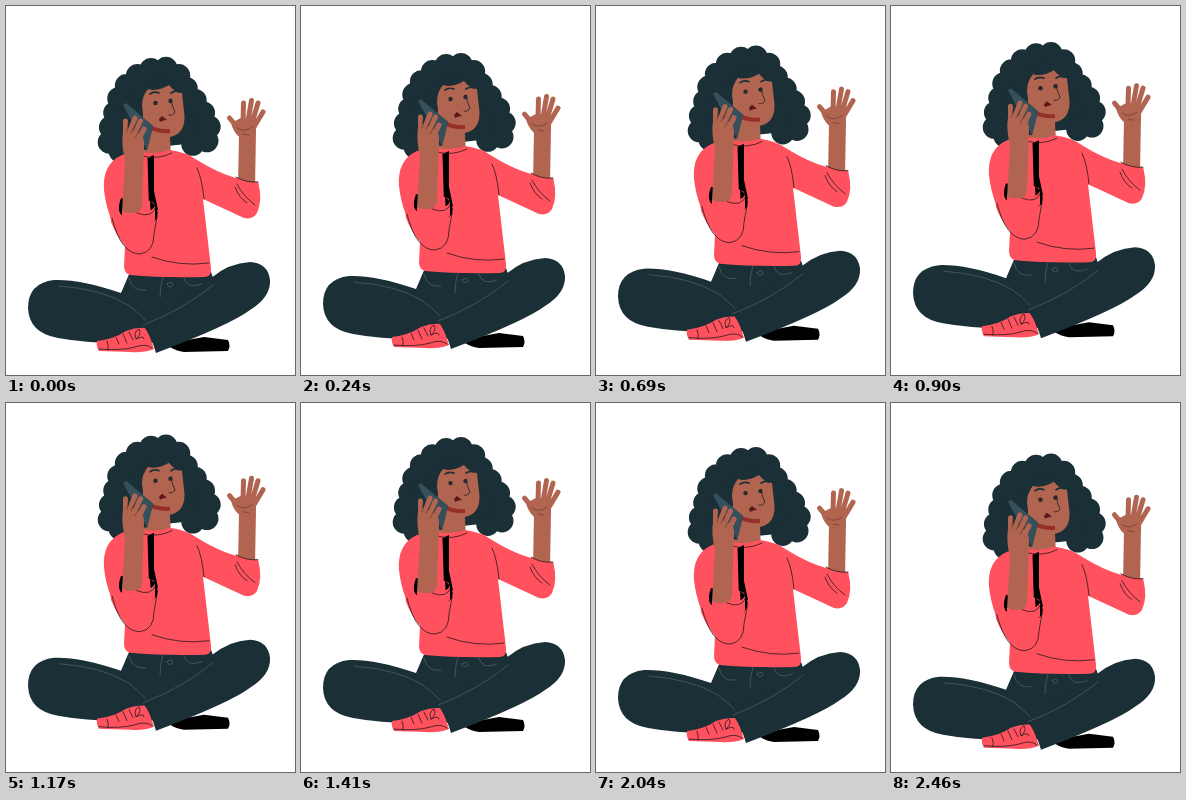
Animation of 289 by 369 pixels, one loop 2.52 s. Source, as an HTML page:

```html
<!DOCTYPE html>
<html lang="en">
<head>
<meta charset="utf-8">
<title>Phone call</title>
<style>
  html, body { margin: 0; width: 100%; height: 100%; overflow: hidden; background: #fff; }
  svg { display: block; width: 100%; height: 100%; }
  .dark { fill: #1b2f36; }
  .skin { fill: #b16551; }
  .red { fill: #ff525e; }
  .finger, .ink, .seam, .crease, .brow, .curls { fill: none; stroke-linecap: round; stroke-linejoin: round; }
  .finger { stroke: #b16551; stroke-width: 5; }
  .ink { stroke: #17181a; stroke-width: .75; }
  .seam { stroke: #5d6d73; stroke-width: .6; }
  .crease { stroke: #6f382d; stroke-width: .7; }
  .brow { stroke: #1b2f36; stroke-width: 1.7; }
  /* Round dots along the outline make the curls */
  .curls { fill: #1b2f36; stroke: #1b2f36; stroke-width: 23; stroke-dasharray: 0 15; }
</style>
</head>
<body>
<svg viewBox="0 0 289 369">
  <g id="figure">
    <g id="head">
      <path class="curls" d="M114 145 C96 143 104 122 109 106 C112 86 126 65 153 62 C172 61 176 74 182 86 C193 98 201 110 204 124 C206 138 194 139 180 138"/>
      <path class="skin" d="M137 108 L135 152 H165 L164 131 Q179 128 178.500 110 L176 87 Q168 86 163 79 Q151 86 142 83 Q136 90 136 100Z"/>
      <path d="M142 118 Q152 124 164 123 V127 Q150 128 141 122Z" fill="#962f28"/>
      <path class="brow" d="M144 88 Q148 85 153 87 M165 87 Q169 84 173 86"/>
      <path class="ink" d="M165 93 Q166 101 169 106 Q167 110 163 109"/>
      <g fill="#242b2e">
        <circle cx="149.500" cy="97" r="2.200"/>
        <circle cx="164.500" cy="95" r="2.200"/>
      </g>
      <path d="M153 113 L156 110 L161 114 Q157 114 154 116Z" fill="#5d1717"/>
    </g>

    <g id="legs">
      <path d="M165 337 L198 331 L222 334 Q225 340 222 345 L178 346 Q170 345 164 341Z"/>
      <path class="dark" d="M124 266 L115 287 Q74 273 48 274 Q22 277 22 302 Q23 327 52 332 Q85 338 122 337 L143 337 L180 332 L210 280 L205 266Z"/>
      <path class="red" d="M91 335 Q108 333 120 325 Q130 321 141 322 L148 343 Q138 347 124 346 L93 345 Q90 340 91 335Z"/>
      <path class="ink" d="M93 343 Q115 345 129 341 Q140 337 146 342 M101 335 Q103 340 102 344 M110 331 L113 338 M117 328 L121 337 M123 326 L127 334 M130 333 Q127 326 133 323 Q136 328 130 333 Q138 329 138 333"/>
      <path class="dark" d="M137 319 L205 272 Q223 257 244 256 Q262 257 264 274 Q265 291 244 304 Q224 319 150 347 Q146 332 137 319Z"/>
      <path class="seam" d="M53 280 Q96 283 122 299 Q132 306 139 314 M137 319 Q177 304 207 279 M123 272 Q126 286 140 284 M157 271 Q154 280 154 291 M178 272 Q181 284 196 278 M161 278 Q166 274 167 279 Q163 283 161 278"/>
    </g>

    <g id="shirt">
      <path class="red" d="M136 146 Q150 149 164 144 Q180 146 191 154 Q212 167 230 172 L252 176 Q257 194 251 207 Q247 214 238 212 L197 193 L205 262 Q206 271 198 271 Q157 272 124 269 Q118 267 118 260 L119 240 Q101 213 98 184 Q96 158 116 149 Q124 146 136 146Z"/>
      <path d="M141.500 152 L148 149 L148 185 L152 204 L143 204Z"/>
      <path class="ink" d="M136 150 Q152 154 166 147 M198 193 Q196 172 191 162 M146 251 Q174 261 203 257"/>
    </g>

    <g id="wave">
      <path class="skin" d="M233 128 L250 125 L249 182 H232Z"/>
      <path class="skin" d="M231 114 Q238 109 249 115 Q251 124 249 131 Q240 135 232 130 Q227 125 225 117Z"/>
      <path class="finger" d="M223.500 112 L232 122 M237.500 97 L237 116 M245.500 94.500 L242 115 M252 97 L246 117 M257 106 L248 121"/>
      <path class="crease" d="M231 122 Q238 127 246 121 M237 128 L243 129"/>
      <path class="red" d="M230 171 Q240 177 252 176 L254 192 L232 189Z"/>
      <path class="ink" d="M230 171 Q240 177 252 176 M231 178 Q237 190 249 199 M229 181 Q233 192 241 197"/>
    </g>

    <g id="call">
      <path class="red" d="M101 176 L148 197 Q152 210 149 222 Q150 248 134 248 Q116 244 105 216Z"/>
      <path class="ink" d="M106 212 Q115 248 134 248 Q148 246 148 228 L151 211"/>
      <path d="M115 192 Q110 206 117 210 L122 208 V194Z"/>
      <path d="M144 195 Q154 201 151 212 Q148 217 145 214Z"/>
      <path class="dark" d="M113 104 Q112 98 119 97 L147 120 L141 144 L134 143Z"/>
      <path d="M117 99 L120 97 L147 120 L141 144Z" fill="#34505d"/>
      <path class="skin" d="M117 126 Q122 120 130 126 Q139 128 138 140 L136 200 Q134 208 126 208 L116 206 L119 154 Q115 138 117 126Z"/>
      <path class="finger" d="M119.500 115 L119.500 130 M129 112 L122 130 M134.500 115 L126 134 M138 123 L130 139"/>
      <path class="crease" d="M122 117 L121 126 M130 117 L125 127 M135 121 L129 132"/>
      <path class="red" d="M116 205 Q127 210 136 204 Q145 207 149 200 V214 Q137 223 116 217Z"/>
      <path class="ink" d="M131 207 Q146 213 150 201"/>
    </g>
  </g>
</svg>
<script>
  const LOOP = 2520, STEP = 30, PEAK = 1215, REST = 2475, RISE = 20;
  const figure = document.getElementById("figure");

  // Steady climb to the peak, steady fall, short rest
  function draw(now) {
    const t = Math.floor((now % LOOP) / STEP) * STEP;
    const lift = t < PEAK ? t / PEAK : Math.max(0, (REST - t) / (REST - PEAK));
    figure.setAttribute("transform", `translate(0 ${-RISE * lift})`);
    requestAnimationFrame(draw);
  }
  draw(0);
</script>
</body>
</html>
```
